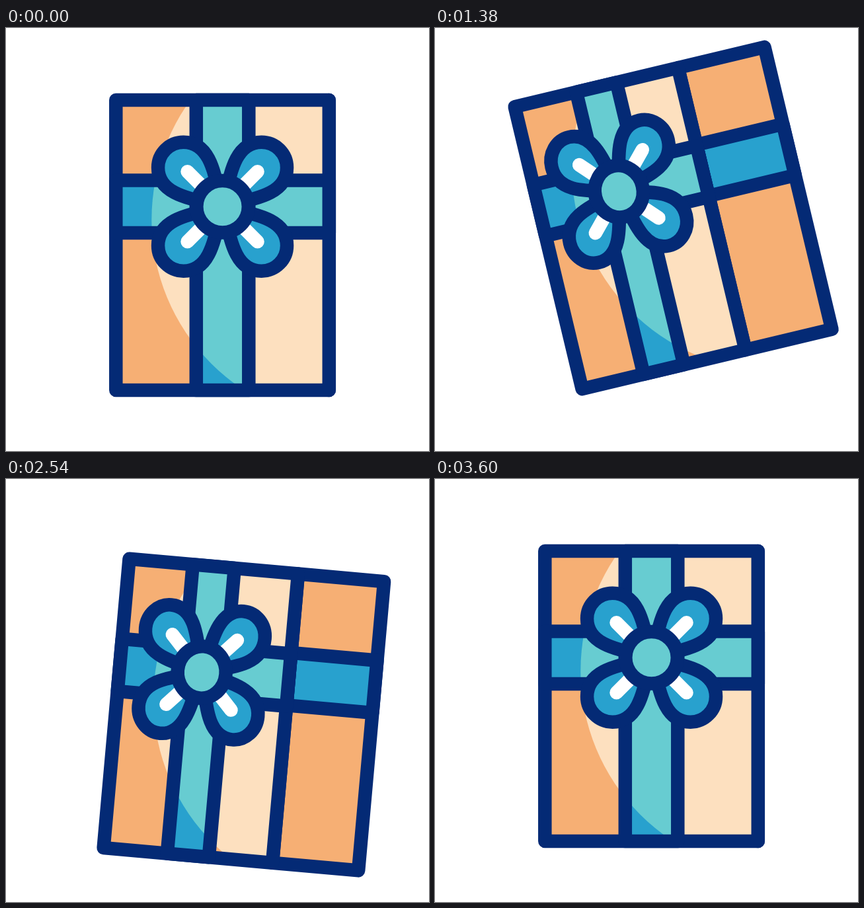
These frames come from a looping animation (640 by 640 pixels, 3620 ms). An HTML page with a canvas:

```html
<!DOCTYPE html>
<html lang="en">
<head>
<meta charset="utf-8">
<title>Gift box</title>
<style>
html, body { margin: 0; width: 100%; height: 100%; overflow: hidden; background: #fff; }
canvas { display: block; width: 640px; height: 640px; }
</style>
</head>
<body>
<canvas id="stage" width="640" height="640"></canvas>
<script>
const ctx = document.getElementById('stage').getContext('2d');
const NAVY = '#042a75', CREAM = '#fde0bf', ORANGE = '#f6af74', TEAL = '#67ccd1', BLUE = '#28a1ce';
const LOOP = 3620, LINE = 20.5;
const BOX_W = 322.5, BOX_H = 439, LEFT = 166.3, MID_Y = 328.4;
const BAND_Y = 121.5, BAND_H = 79.5;
const UP = 1180, DOWN = 2440, END = 3600;

const mix = (a, b, k) => a + (b - a) * k;

function ease(t, start, end) {
  const x = Math.min(1, Math.max(0, (t - start) / (end - start)));
  return x * x * (3 - 2 * x);
}

function outline(fill) {
  if (fill) {
    ctx.fillStyle = fill;
    ctx.fill();
  }
  ctx.strokeStyle = NAVY;
  ctx.stroke();
}

function box(x, y, w, h, fill) {
  ctx.beginPath();
  ctx.rect(x, y, w, h);
  outline(fill);
}

// Fills a rectangle in shade, with the large round light patch on top
function litRect(x, y, w, h, shade, light) {
  ctx.save();
  ctx.beginPath();
  ctx.rect(x, y, w, h);
  ctx.clip();
  ctx.fillStyle = shade;
  ctx.fill();
  ctx.beginPath();
  ctx.arc(362, 181, 308, 0, 7);
  ctx.fillStyle = light;
  ctx.fill();
  ctx.restore();
  box(x, y, w, h);
}

// Builds a path in scaled space so that its stroke keeps an even width
function scaledPath(sx, sy, build) {
  ctx.save();
  ctx.scale(sx, sy);
  ctx.beginPath();
  build();
  ctx.restore();
}

function bow(x, y, sx) {
  ctx.save();
  ctx.translate(x, y);
  for (const [dx, dy] of [[1, 1], [-1, 1], [1, -1], [-1, -1]]) {
    scaledPath(sx * dx, dy, () => {
      ctx.moveTo(-3, -10);
      ctx.bezierCurveTo(-12, -50, -19, -97.5, -59, -97.5);
      ctx.arc(-59, -59, 38.5, -Math.PI / 2, Math.PI, true);
      ctx.bezierCurveTo(-97.5, -19, -50, -12, -10, -3);
      ctx.closePath();
    });
    outline(BLUE);
    scaledPath(sx * dx, dy, () => {
      ctx.moveTo(-53, -53);
      ctx.lineTo(-25, -25);
    });
    ctx.strokeStyle = '#fff';
    ctx.stroke();
  }
  scaledPath(sx, 1, () => ctx.arc(0, 0, 39.25, 0, 7));
  outline(TEAL);
  ctx.restore();
}

function draw(t) {
  const turn = ease(t, 0, UP) - ease(t, DOWN, END);
  const front = BOX_W - 68.5 * (ease(t, 0, UP - 20) - ease(t, DOWN - 20, END - 120));
  const width = BOX_W + 66 * turn;

  // Tilt up, swing down, then settle
  const sway = (up, down) => t < UP ? up * ease(t, 0, UP)
    : t < DOWN ? mix(up, down, ease(t, UP, DOWN))
    : down * (1 - ease(t, DOWN, END));

  ctx.fillStyle = '#fff';
  ctx.fillRect(0, 0, 640, 640);
  ctx.save();
  ctx.translate(LEFT + width / 2, MID_Y + sway(-46, 28.8));
  ctx.rotate(sway(-14.8, 5.2) * Math.PI / 180);
  ctx.translate(-width / 2, -BOX_H / 2);
  ctx.lineWidth = LINE;
  ctx.lineJoin = ctx.lineCap = 'round';

  box(front, 0, width - front, BOX_H, ORANGE);
  box(front, BAND_Y - 1.6 * turn, width - front, BAND_H, BLUE);

  const ribbon = front * 0.2465;
  litRect(0, 0, front, BOX_H, ORANGE, CREAM);
  litRect(0, BAND_Y, front, BAND_H, BLUE, TEAL);
  litRect((front - ribbon) / 2, 0, ribbon, BOX_H, BLUE, TEAL);
  bow(mix(161.25, 123.6, turn), 161.25, mix(1, 0.928, turn));
  ctx.restore();
}

function tick() {
  draw(performance.now() % LOOP);
  requestAnimationFrame(tick);
}
tick();
</script>
</body>
</html>
```
